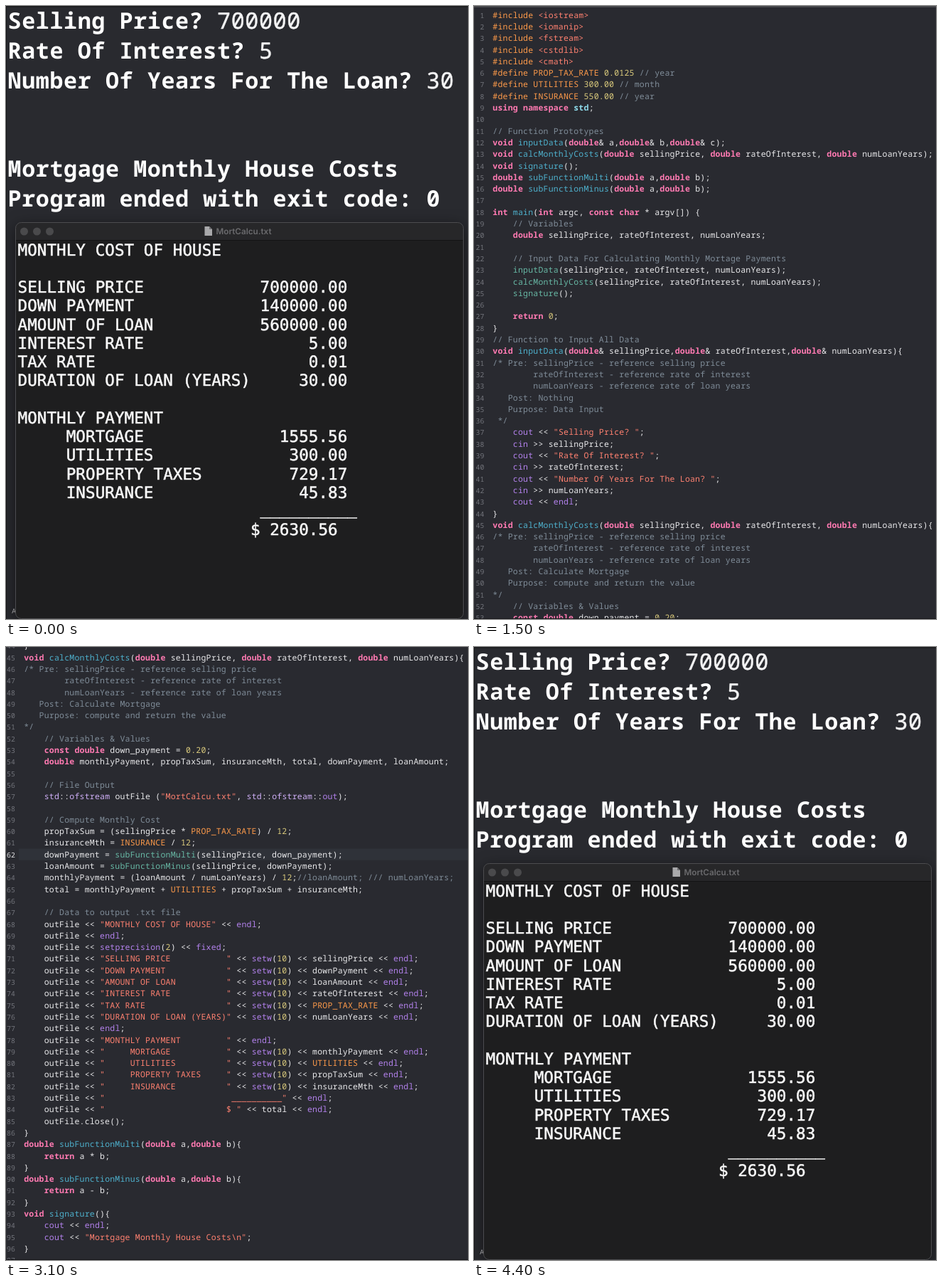
Recreate the animation shown at these times as an HTML page. Size 650x862 px, loop 5 s.

```html
<!DOCTYPE html>
<html lang="en">
<head>
<meta charset="utf-8">
<title>Mortgage calculator</title>
<style>
  html, body { margin: 0; width: 100%; height: 100%; overflow: hidden; background: #292a30; }
  svg { display: block; width: 100%; height: 100%; }
  text { white-space: pre; text-rendering: geometricPrecision; }

  #top, #tail { visibility: hidden; animation: 5s step-end infinite; }
  #top { animation-name: top; }
  #tail { animation-name: tail; }
  @keyframes top { 0%, 50%, 100% { visibility: hidden; } 30% { visibility: visible; } }
  @keyframes tail { 0%, 70%, 100% { visibility: hidden; } 50% { visibility: visible; } }

  .code { font: 500 11.5px "Noto Sans Mono", "DejaVu Sans Mono", monospace; letter-spacing: .22px; fill: #e9e9eb; }
  .num { font: 400 9.8px "Noto Sans Mono", monospace; fill: #72747b; text-anchor: end; }
  .num.on { fill: #e4e4e6; }
  .note { fill: #7f8c98; }
  .str { fill: #ff8170; }
  .pre { fill: #fd9a4a; }
  .key { fill: #ff7ab2; font-weight: 700; }
  .decl { fill: #4eb0cc; }
  .call { fill: #67b7a4; }
  .lib { fill: #b281eb; }
  .type { fill: #d0b0f8; }
  .ns { fill: #8fdcec; font-weight: 600; }
  .digit { fill: #d9c97c; }

  .shell { font: 700 31.7px "Noto Sans Mono", "DejaVu Sans Mono", monospace; letter-spacing: .62px; fill: #fff; }
  .typed { font-weight: 500; fill: #f4f4f5; stroke: #f4f4f5; stroke-width: .5px; }
  .report { font: 22.6px "DejaVu Sans Mono", monospace; letter-spacing: .04px; fill: #fafafa; stroke: #fafafa; stroke-width: .5px; }
  .title { font: 600 11.7px Inter, "Open Sans", sans-serif; fill: #6b6b6e; }
  .window { filter: drop-shadow(0 5px 10px rgba(0, 0, 0, .5)); }
</style>
</head>
<body>
<svg viewBox="0 0 650 862" preserveAspectRatio="none">
  <g id="run">
    <rect width="650" height="862" fill="#292a2f"/>
    <rect width="650" height="1.5" fill="#1a1a1d"/>
    <rect width="1" height="862" fill="#131316"/>
    <g id="shell"></g>
    <text x="8" y="854" font-family="Inter, sans-serif" font-size="9" fill="#c4c4c6">A</text>
    <g class="window">
      <rect x="13.5" y="304.5" width="630" height="557" rx="8" fill="#1e1e1f"/>
      <path d="M13.5 329.5V312.5a8 8 0 0 1 8-8H635.5a8 8 0 0 1 8 8V329.5Z" fill="#272729"/>
      <path d="M14 329.5H643" stroke="#141415"/>
      <rect x="13.5" y="304.5" width="630" height="557" rx="8" fill="none" stroke="#4c4c4f"/>
    </g>
    <g fill="#4a4a4c">
      <circle cx="25.5" cy="317" r="5.5"/>
      <circle cx="43.5" cy="317" r="5.5"/>
      <circle cx="61.5" cy="317" r="5.5"/>
    </g>
    <path d="M279.500 310H286L290 314V323H279.500Z" fill="#a9a9ab"/>
    <path d="M286 310V314H290Z" fill="#6f6f72"/>
    <text class="title" x="295.500" y="320.500">MortCalcu.txt</text>
    <g id="report"></g>
  </g>
  <g id="top"></g>
  <g id="tail"></g>
</svg>
<script>
const source = String.raw`#include <iostream>
#include <iomanip>
#include <fstream>
#include <cstdlib>
#include <cmath>
#define PROP_TAX_RATE 0.0125 // year
#define UTILITIES 300.00 // month
#define INSURANCE 550.00 // year
using namespace std;

// Function Prototypes
void inputData(double& a,double& b,double& c);
void calcMonthlyCosts(double sellingPrice, double rateOfInterest, double numLoanYears);
void signature();
double subFunctionMulti(double a,double b);
double subFunctionMinus(double a,double b);

int main(int argc, const char * argv[]) {
    // Variables
    double sellingPrice, rateOfInterest, numLoanYears;

    // Input Data For Calculating Monthly Mortage Payments
    inputData(sellingPrice, rateOfInterest, numLoanYears);
    calcMonthlyCosts(sellingPrice, rateOfInterest, numLoanYears);
    signature();

    return 0;
}
// Function to Input All Data
void inputData(double& sellingPrice,double& rateOfInterest,double& numLoanYears){
/* Pre: sellingPrice - reference selling price
        rateOfInterest - reference rate of interest
        numLoanYears - reference rate of loan years
   Post: Nothing
   Purpose: Data Input
 */
    cout << "Selling Price? ";
    cin >> sellingPrice;
    cout << "Rate Of Interest? ";
    cin >> rateOfInterest;
    cout << "Number Of Years For The Loan? ";
    cin >> numLoanYears;
    cout << endl;
}
void calcMonthlyCosts(double sellingPrice, double rateOfInterest, double numLoanYears){
/* Pre: sellingPrice - reference selling price
        rateOfInterest - reference rate of interest
        numLoanYears - reference rate of loan years
   Post: Calculate Mortgage
   Purpose: compute and return the value
*/
    // Variables & Values
    const double down_payment = 0.20;
    double monthlyPayment, propTaxSum, insuranceMth, total, downPayment, loanAmount;

    // File Output
    std::ofstream outFile ("MortCalcu.txt", std::ofstream::out);

    // Compute Monthly Cost
    propTaxSum = (sellingPrice * PROP_TAX_RATE) / 12;
    insuranceMth = INSURANCE / 12;
    downPayment = subFunctionMulti(sellingPrice, down_payment);
    loanAmount = subFunctionMinus(sellingPrice, downPayment);
    monthlyPayment = (loanAmount / numLoanYears) / 12;//loanAmount; /// numLoanYears;
    total = monthlyPayment + UTILITIES + propTaxSum + insuranceMth;

    // Data to output .txt file
    outFile << "MONTHLY COST OF HOUSE" << endl;
    outFile << endl;
    outFile << setprecision(2) << fixed;
    outFile << "SELLING PRICE           " << setw(10) << sellingPrice << endl;
    outFile << "DOWN PAYMENT            " << setw(10) << downPayment << endl;
    outFile << "AMOUNT OF LOAN          " << setw(10) << loanAmount << endl;
    outFile << "INTEREST RATE           " << setw(10) << rateOfInterest << endl;
    outFile << "TAX RATE                " << setw(10) << PROP_TAX_RATE << endl;
    outFile << "DURATION OF LOAN (YEARS)" << setw(10) << numLoanYears << endl;
    outFile << endl;
    outFile << "MONTHLY PAYMENT         " << endl;
    outFile << "     MORTGAGE           " << setw(10) << monthlyPayment << endl;
    outFile << "     UTILITIES          " << setw(10) << UTILITIES << endl;
    outFile << "     PROPERTY TAXES     " << setw(10) << propTaxSum << endl;
    outFile << "     INSURANCE          " << setw(10) << insuranceMth << endl;
    outFile << "                         __________" << endl;
    outFile << "                        $ " << total << endl;
    outFile.close();
}
double subFunctionMulti(double a,double b){
    return a * b;
}
double subFunctionMinus(double a,double b){
    return a - b;
}
void signature(){
    cout << endl;
    cout << "Mortgage Monthly House Costs\n";
}
`;

const rules = {
  note: String.raw`\/\*[\s\S]*?\*\/|\/\/.*`,
  str: String.raw`"[^"]*"|<\w+>`,
  pre: String.raw`#\w+|\b(?:PROP_TAX_RATE|UTILITIES|INSURANCE)\b`,
  key: String.raw`\b(?:void|double|int|char|const|return|using|namespace)\b`,
  decl: String.raw`(?<=^(?:void|double|int) )\w+(?=\()`,
  call: String.raw`\b(?:inputData|calcMonthlyCosts|signature|subFunction\w+)\b`,
  ns: String.raw`\bstd(?=;)`,
  type: String.raw`\b(?:std|ofstream)\b`,
  lib: String.raw`\b(?:cout|cin|endl|setw|setprecision|fixed|out)\b`,
  digit: String.raw`\b\d[\d.]*`,
  plain: '[<>&]'
};
const token = new RegExp(Object.entries(rules).map(([k, r]) => `(?<${k}>${r})`).join('|'), 'gm');
const esc = s => s.replace(/&/g, '&amp;').replace(/</g, '&lt;').replace(/>/g, '&gt;');
const text = (cls, x, y, body) => `<text class="${cls}" x="${x}" y="${y}">${body}</text>`;
const span = (cls, body) => `<tspan class="${cls}">${body}</tspan>`;
const fill = (id, html) => { document.getElementById(id).innerHTML = html; };

// Wrap every token line by line, so that block comments survive the split.
const lines = source.replace(token, (all, ...rest) => {
  const groups = rest[rest.length - 1];
  const cls = Object.keys(rules).find(k => groups[k] !== undefined);
  return all.split('\n').map(s => span(cls, esc(s))).join('\n');
}).split('\n');

const pitch = 16.3;
function listing(from, to, x, numX, base, active) {
  let out = '<rect width="650" height="862" fill="#292a30"/>';
  for (let n = from; n <= to; n++) {
    const y = +(base + (n - from) * pitch).toFixed(2);
    const on = n === active;
    if (on) out += `<rect x="18" y="${y - 12.2}" width="632" height="${pitch}" fill="#2f3239"/>`;
    out += text(on ? 'num on' : 'num', numX, y, n) + text('code', x, y, lines[n - 1]);
  }
  return out;
}
const edge = (y, h, color) => `<rect y="${y}" width="650" height="${h}" fill="${color}"/>`;

fill('top', listing(1, 53, 26.3, 14.3, 16.6) + edge(0, 2, '#47484c') + edge(861, 1, '#17171a'));
fill('tail', listing(44, 97, 25.2, 12.8, 18.6 - pitch, 62) + edge(861, 1, '#17171a'));

const shell = [
  ['Selling Price? ', '700000'],
  ['Rate Of Interest? ', '5'],
  ['Number Of Years For The Loan? ', '30'],
  [], [],
  ['Mortgage Monthly House Costs'],
  ['Program ended with exit code: 0']
];
fill('shell', shell.map(([ask = '', typed = ''], i) =>
  text('shell', 2.5, 32.2 + i * 41.65, ask + span('typed', typed))).join(''));

const row = (label, value) => label.padEnd(24) + value.padStart(10);
const report = [
  'MONTHLY COST OF HOUSE', '',
  row('SELLING PRICE', '700000.00'),
  row('DOWN PAYMENT', '140000.00'),
  row('AMOUNT OF LOAN', '560000.00'),
  row('INTEREST RATE', '5.00'),
  row('TAX RATE', '0.01'),
  row('DURATION OF LOAN (YEARS)', '30.00'), '',
  'MONTHLY PAYMENT',
  row('     MORTGAGE', '1555.56'),
  row('     UTILITIES', '300.00'),
  row('     PROPERTY TAXES', '729.17'),
  row('     INSURANCE', '45.83'),
  ' '.repeat(25) + '_'.repeat(10),
  ' '.repeat(24) + '$ 2630.56'
];
// The rule above the total sits slightly higher than the font's underscore.
fill('report', report.map((s, i) =>
  text('report', 16.5, 350.5 + i * 26.25 - (s.includes('_') ? 3.5 : 0), s)).join(''));
</script>
</body>
</html>
```
